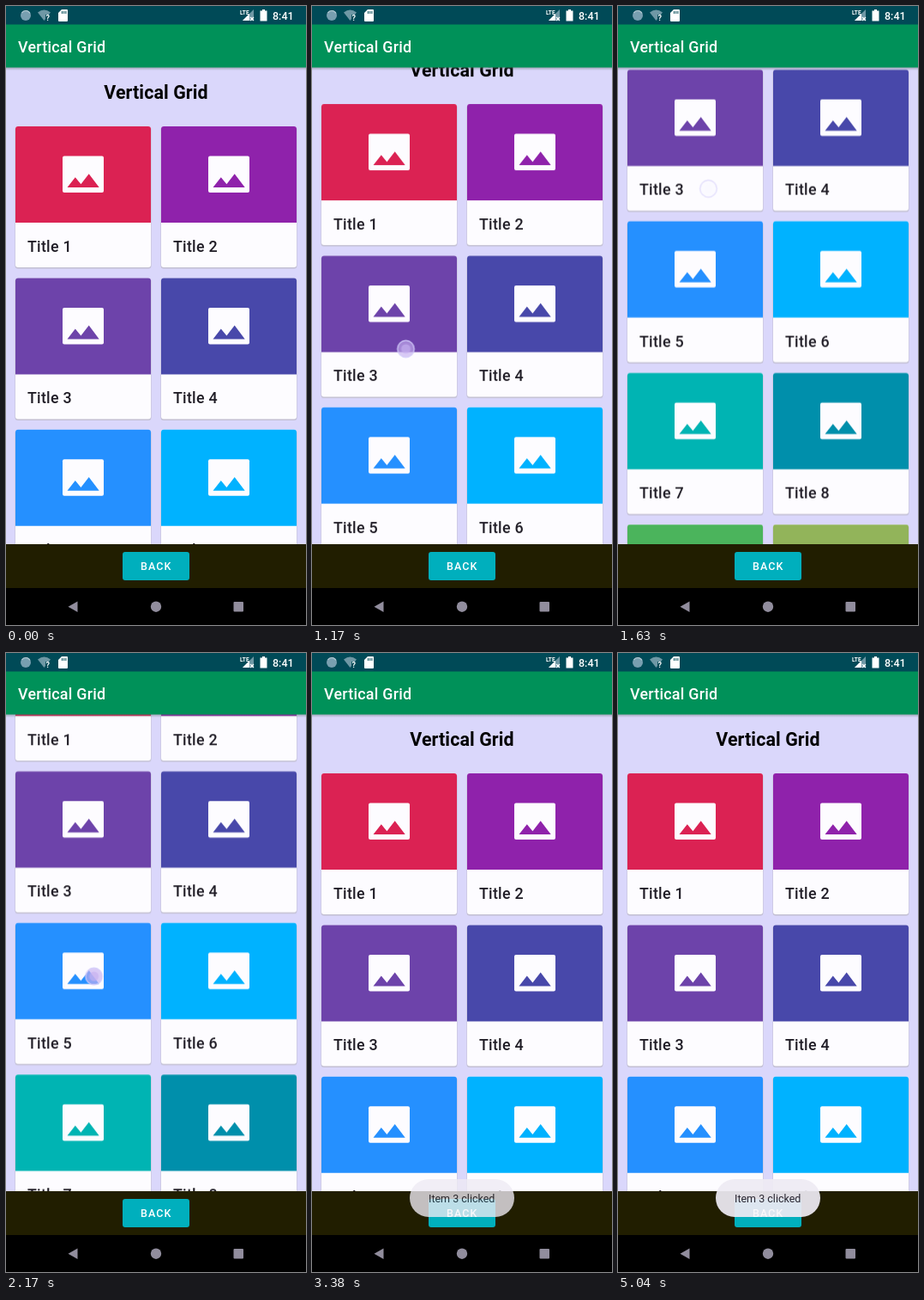
These frames come from a looping animation (350 by 720 pixels, 5080 ms). An HTML page:

```html
<!DOCTYPE html>
<html lang="en">
<head>
<meta charset="utf-8">
<title>Vertical Grid</title>
<style>
  html, body { margin: 0; width: 100%; height: 100%; overflow: hidden; background: #dad7fb; }
  svg { display: block; width: 350px; height: 720px; font-family: Roboto, "Noto Sans", sans-serif; }

  .title { font-size: 17.86px; font-weight: 500; letter-spacing: .25px; }
  .heading { font-size: 21.4px; font-weight: 700; letter-spacing: .1px; text-anchor: middle; }
  .small { font-size: 12.5px; }
  .medium { font-weight: 500; }
  .white { fill: #fff; }

  #list, #touch, #dot, #glow, #toast { animation: 5080ms linear infinite; }
  #list { animation-name: scroll; }
  #touch { animation-name: move; }
  #dot { animation-name: press; }
  #glow { animation-name: glow; transform-origin: 175px 71px; }
  #toast { animation-name: toast; }

  @keyframes scroll {
    0%, 21.46% { transform: translateY(0); animation-timing-function: cubic-bezier(.4, .2, .7, .7); }
    26.38% { transform: translateY(-110px); }
    32.09% { transform: translateY(-242px); animation-timing-function: cubic-bezier(.33, .5, .6, 1); }
    38.4%, 39.4% { transform: translateY(-340px); animation-timing-function: cubic-bezier(.35, .1, .6, .9); }
    46.6%, 100% { transform: translateY(0); }
  }
  @keyframes move {
    0%, 21.2% { transform: translate(110px, 430px); animation-timing-function: cubic-bezier(.4, .2, .7, .7); }
    26.38% { transform: translate(108px, 314px); }
    30.9%, 32.5% { transform: translate(105.5px, 212.5px); }
    32.51%, 39.2% { transform: translate(100px, 225px); animation-timing-function: cubic-bezier(.35, .1, .6, .9); }
    47.4%, 49% { transform: translate(106px, 578px); }
    49.01%, 100% { transform: translate(98px, 405px); }
  }
  @keyframes press {
    0%, 20.4% { opacity: 0; fill-opacity: .65; }
    21.4%, 30.9% { opacity: 1; fill-opacity: .65; }
    32.09% { opacity: .75; fill-opacity: 0; }
    32.5%, 38.6% { opacity: 0; fill-opacity: .65; }
    39.4%, 47.4% { opacity: 1; fill-opacity: .65; }
    49%, 59.2% { opacity: 0; fill-opacity: .65; }
    60.2%, 62% { opacity: 1; fill-opacity: .65; }
    64%, 100% { opacity: 0; fill-opacity: 0; }
  }
  @keyframes glow {
    0%, 45.8% { opacity: 0; transform: scaleY(0); }
    47.6% { opacity: .65; transform: scaleY(1.15); }
    50% { opacity: .45; transform: scaleY(1); }
    52%, 100% { opacity: 0; transform: scaleY(.5); }
  }
  @keyframes toast {
    0%, 64% { opacity: 0; }
    67%, 100% { opacity: 1; }
  }
</style>
</head>
<body>
<svg viewBox="0 0 350 720">
  <defs>
    <g id="card">
      <rect x="-.5" y=".5" width="159" height="165" rx="3.5" fill="#bab7c4" opacity=".75"/>
      <rect width="158" height="164" rx="3" fill="#fdfcff"/>
      <path d="M0 112V3Q0 0 3 0H155Q158 0 158 3V112Z" fill="currentColor"/>
      <rect x="55" y="34.5" width="48" height="42.5" rx="2" fill="#fdfcff"/>
      <path d="M60.5 71L69.8 59.2L76.4 67.2L85.7 55.2L97.7 71Z" fill="currentColor"/>
    </g>
    <linearGradient id="shade" x2="0" y2="1">
      <stop stop-color="#5b6b6a" stop-opacity=".5"/>
      <stop offset="1" stop-color="#5b6b6a" stop-opacity="0"/>
    </linearGradient>
  </defs>

  <rect width="350" height="720" fill="#dad7fb"/>
  <g id="list">
    <text class="heading" x="175" y="108">Vertical Grid</text>
  </g>
  <path id="glow" d="M0 71V77Q175 119 350 77V71Z" fill="#e6e2b0"/>

  <!-- app bar and bottom bar -->
  <rect y="71" width="350" height="4" fill="url(#shade)"/>
  <rect y="21" width="350" height="50.5" fill="#009159"/>
  <text class="title white" x="14" y="53.5">Vertical Grid</text>
  <rect y="626" width="350" height="52" fill="#211e00"/>
  <rect x="136" y="635" width="78" height="33" rx="3" fill="#00afbd"/>
  <text class="small medium white" x="157" y="656" letter-spacing="1.1">BACK</text>

  <!-- status bar -->
  <rect width="350" height="21.5" fill="#004a57"/>
  <circle cx="23" cy="11" r="6" fill="#789fb0"/>
  <path d="M18.5 8A5.5 5.5 0 0 1 28 8.5" fill="none" stroke="#b7ccd5" stroke-width="1.2"/>
  <path d="M37 7.5Q44.5 1.5 52 7.5L50 10H46V15L44.5 17Z" fill="#6f98a5"/>
  <text x="46.5" y="17" font-size="9" font-weight="700" class="white">?</text>
  <path d="M65 4H71Q72 4 72 5V17Q72 18 71 18H62Q61 18 61 17V8Z" class="white"/>
  <path d="M65.5 6V9M67.7 6V9M69.9 6V9" stroke="#004a57"/>
  <path d="M289 4V17H276Z" fill="#6f98a5"/>
  <path d="M284 9V17H276Z" class="white"/>
  <path d="M285 13L289 17M289 13L285 17" stroke="#fff" stroke-width="1.2"/>
  <text x="273" y="10" font-size="6.5" font-weight="700" class="white">LTE</text>
  <path d="M299 4H302V5.5H304.5V17.5H296.5V5.5H299Z" class="white"/>
  <text class="small medium white" x="311" y="15.5">8:41</text>

  <!-- navigation bar -->
  <rect y="677" width="350" height="43"/>
  <g fill="#918d9d">
    <path d="M83.5 692.5V705L72.5 698.8Z"/>
    <circle cx="175" cy="698.7" r="6.2"/>
    <rect x="265.5" y="693" width="11.5" height="11.5" rx="1"/>
  </g>

  <g id="toast">
    <rect x="114" y="612" width="122" height="44" rx="22" fill="#eeebf4" opacity=".93"/>
    <text class="small" x="136" y="639" fill="#292631">Item 3 clicked</text>
    <text class="small white" x="157" y="656" letter-spacing="1.1" opacity=".65">BACK</text>
  </g>

  <g id="touch">
    <g id="dot" fill="#c4aff0">
      <circle r="9.8" stroke="#d2ccfa" stroke-width="1.2"/>
      <circle r="5.5"/>
    </g>
  </g>
</svg>
<script>
  const colors = ["#db2253", "#8f22ab", "#6d43aa", "#4848aa", "#2590ff", "#00b2ff",
                  "#00b4b3", "#008fab", "#4bb45c", "#92b45a", "#d2dc3c", "#ffe93b"];
  const list = document.getElementById("list");
  list.insertAdjacentHTML("beforeend", colors.map((color, i) => {
    const x = i % 2 ? 181 : 11;
    const y = 140 + Math.floor(i / 2) * 176.4;
    return `<g transform="translate(${x} ${y})">
      <use href="#card" color="${color}"/>
      <text class="title" x="14" y="146" fill="#201d26">Title ${i + 1}</text>
    </g>`;
  }).join(""));
</script>
</body>
</html>
```
